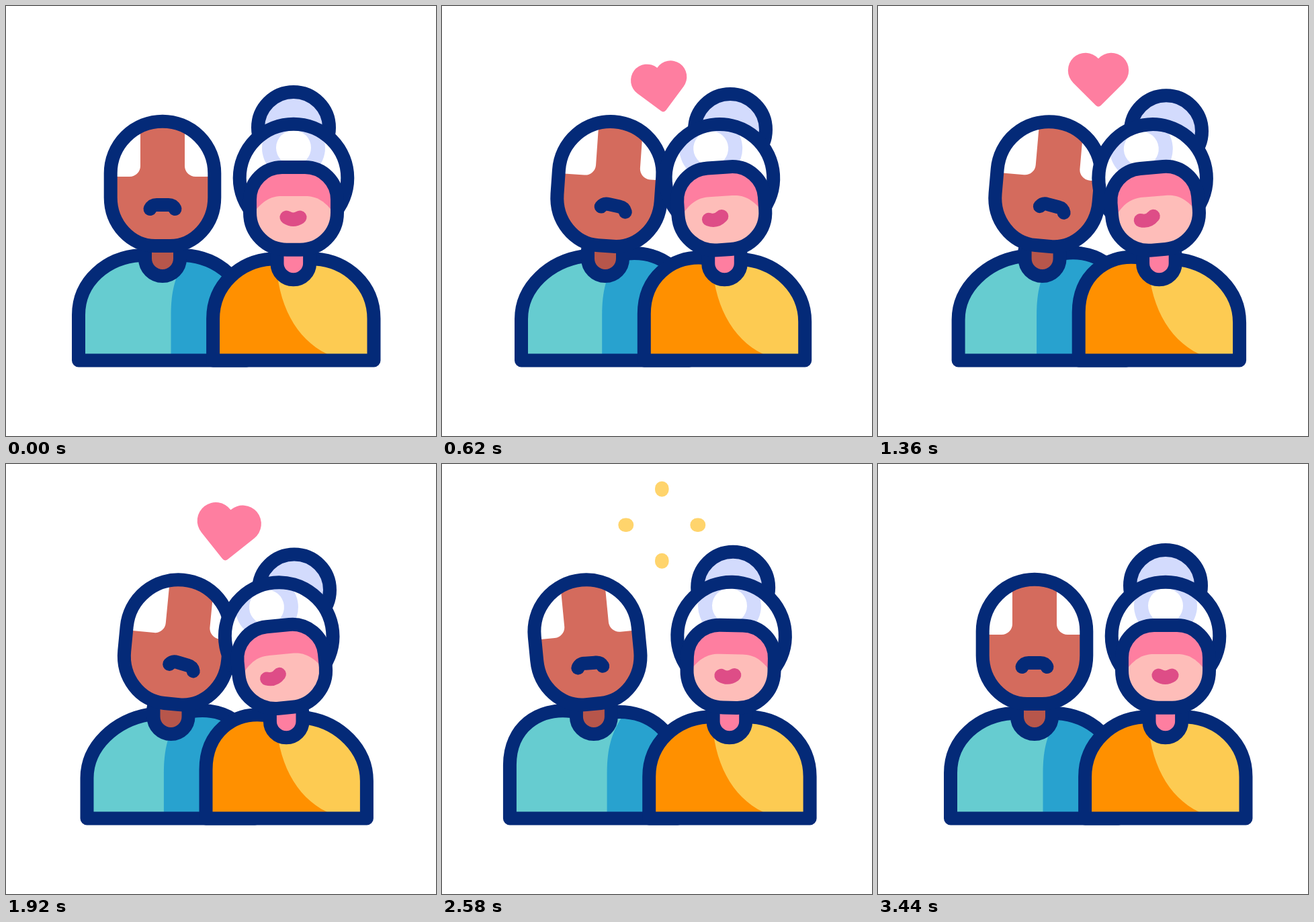
An HTML page with a canvas that plays this animation: 640 px wide and 640 px high, repeating every 3500 ms.

```html
<!DOCTYPE html>
<html lang="en">
<head>
<meta charset="utf-8">
<title>Couple in love</title>
<style>
  html, body { margin: 0; height: 100%; overflow: hidden; background: #fff; }
  canvas { display: block; }
</style>
</head>
<body>
<canvas width="640" height="640"></canvas>
<script>
const ctx = document.querySelector('canvas').getContext('2d');
const LOOP = 3500, NAVY = '#042a78', PINK = '#fe7ea0', LAVENDER = '#d3dbfd';

// Smooth curve through key values that never overshoots them
function curve(times, values) {
  const slope = i => (values[i + 1] - values[i]) / (times[i + 1] - times[i]);
  const tangent = i => {
    if (i === 0 || i === times.length - 1) return 0;
    const a = slope(i - 1), b = slope(i);
    return a * b <= 0 ? 0 : 2 * a * b / (a + b);
  };
  return t => {
    if (t >= times[times.length - 1]) return values[values.length - 1];
    let i = 0;
    while (t >= times[i + 1]) i++;
    const span = times[i + 1] - times[i], u = (t - times[i]) / span, v = 1 - u;
    return values[i] * v * v * (1 + 2 * u) + values[i + 1] * u * u * (3 - 2 * u)
      + span * u * v * (tangent(i) * v - tangent(i + 1) * u);
  };
}

const TIMES = [0, 620, 1360, 1920, 2100, 2300, 2700, 2860, 3260, 3440];
const sway = (...values) => curve(TIMES, values);
const man = {
  shift: sway(0, 10, 11.6, 12.5, 12.7, 6, -9.5, -6, -0.3, 0),
  tilt: sway(0, 4, 5, 5.5, 5.6, 1.5, -6.8, -4.5, -0.3, 0),
  turn: sway(0, 0.78, 0.92, 1, 1, 0.7, 0, 0, 0, 0)
};
const woman = {
  shift: sway(0, -7.3, -9.4, -10.6, -10.7, -8, 3, 5, 0.4, 0),
  tilt: sway(0, -3.8, -4.9, -5.5, -5.6, -3.2, 3, 4.9, 0.4, 0),
  turn: sway(0, 0.7, 0.93, 1, 1, 0.93, 0.05, 0, 0, 0),
  bunX: sway(0, 1, 1, 1, 1.2, 2.5, 6, 6.5, 0.5, 0),
  bunY: sway(0, 3, 5.3, 6.5, 6.5, 5, 2, 1.5, 0, 0)
};
const heartPop = curve([0, 480, 2160, 2260], [0, 1, 1, 0]);

const fill = (path, color) => { ctx.fillStyle = color; ctx.fill(path); };
const stroke = (path, color = NAVY, width = 20) => {
  ctx.strokeStyle = color;
  ctx.lineWidth = width;
  ctx.stroke(path);
};
const group = draw => { ctx.save(); draw(); ctx.restore(); };
const rotateAt = (x, y, degrees) => {
  ctx.translate(x, y);
  ctx.rotate(degrees * Math.PI / 180);
  ctx.translate(-x, -y);
};
const circle = (x, y, r) => {
  const path = new Path2D();
  path.arc(x, y, r, 0, 2 * Math.PI);
  return path;
};
const box = (x, y, w, h, radii) => {
  const path = new Path2D();
  path.roundRect(x, y, w, h, radii);
  return path;
};

// Filled outline with inner details clipped to it
function shape(path, color, details) {
  fill(path, color);
  group(() => { ctx.clip(path); details(); });
  stroke(path);
}

// left and right lift or drop each shoulder
function bodyPath(x, half, top, left, right) {
  const l = x - half, r = x + half;
  return new Path2D(`M${l} 527.5V${top + 89 + left}
    C${l} ${top + 38 + left * 1.4} ${x - half * 0.66} ${top + 3 + left} ${x - 33} ${top + left * 0.25}
    L${x + 33} ${top + right * 0.25}
    C${x + half * 0.66} ${top + 3 + right} ${r} ${top + 38 + right * 1.4} ${r} ${top + 89 + right}
    V527.5Z`);
}

function collar(x, y, r, color) {
  const path = new Path2D(`M${x - r} ${y - 14}V${y}a${r} ${r} 0 0 0 ${2 * r} 0V${y - 14}`);
  fill(path, color);
  stroke(path);
}

const shoulders = lean => [lean > 0 ? lean * 0.6 : lean * 1.7, -Math.abs(lean)];

const manHead = new Path2D('M155.7 249a77.3 77.3 0 0 1 154.6 0V285c0 40-30 72-66 72H222c-36 0-66.3-32-66.3-72Z');
const moustache = new Path2D('M214.5 302C218 295 222 296 226 296H240C244 296 248 295 251.5 302');
const hairLeft = box(90, 150, 110, 104, [0, 0, 16, 0]);
const hairRight = box(266, 150, 110, 104, [0, 0, 0, 16]);

function drawMan(t) {
  const shift = man.shift(t), turn = man.turn(t), shade = woman.shift(t);
  const [left, right] = shoulders(shift);
  shape(bodyPath(233 + shift, 125, 371, left, right), '#66ccd0', () => {
    ctx.translate(shade, 0);
    fill(new Path2D('M245.5 530V460c0-35 6-60 24-86L300 340H420V530Z'), '#28a2cf');
  });
  collar(233 + shift, 376, 26, '#b7564b');
  group(() => {
    ctx.translate(shift, 0);
    rotateAt(233, 365, man.tilt(t));
    shape(manHead, '#d46b5d', () => {
      ctx.translate(13 * turn, 0);
      fill(hairLeft, '#fff');
      fill(hairRight, '#fff');
    });
    ctx.translate(10 * turn, 0);
    rotateAt(233, 299, 11 * turn);
    stroke(moustache);
  });
}

const hair = circle(428, 256, 80.3);
const face = box(363, 240, 130, 122.7, [48, 48, 55, 55]);
const cheeks = new Path2D('M360 320C379 290 393 283 411 283H445C463 283 477 290 496 320V370H360Z');
const lips = new Path2D('M417.5 314.5Q427.5 321 437.5 314.5');
const sunnySide = new Path2D('M402 350V370C402 440 430 495 478 518V540H600V350Z');

function drawWoman(t) {
  const shift = woman.shift(t), turn = woman.turn(t);
  const [right, left] = shoulders(-shift);
  shape(bodyPath(427.8 + shift, 119.7, 376.5, left, right), '#ff9000', () => fill(sunnySide, '#fdcb52'));
  collar(427.8 + shift, 383, 24.3, PINK);
  const bun = circle(428 + woman.bunX(t), 181 + woman.bunY(t), 53);
  fill(bun, LAVENDER);
  stroke(bun);
  group(() => {
    ctx.translate(shift, 0);
    rotateAt(428, 373, woman.tilt(t));
    shape(hair, '#fff', () => {
      ctx.translate(-14 * turn, 0);
      fill(circle(428, 211, 47), LAVENDER);
      fill(circle(428, 211, 26), '#fff');
    });
    shape(face, PINK, () => fill(cheeks, '#febdb9'));
    ctx.translate(-13.5 * turn, 0);
    rotateAt(427.5, 316, -14 * turn);
    stroke(lips, '#de4d87');
  });
}

const heart = new Path2D(`M0-32.2A26 26 0 1 0-37.4 3.9L-4 37.3Q0 41.3 4 37.3
  L37.4 3.9A26 26 0 1 0 0-32.2Z`);

function drawHeart(t) {
  const pop = heartPop(t), drift = t - 1360;
  if (pop < 0.01) return;
  group(() => {
    ctx.translate(328 + drift * 0.0045, 110.5 - drift * 0.0149);
    ctx.rotate(drift * 0.0116 * Math.PI / 180);
    const size = pop * (1 + drift * 0.0001);
    ctx.scale(size, size);
    fill(heart, PINK);
  });
}

function drawSparkle(t) {
  const start = 2205, end = 2760;
  if (t < start || t > end) return;
  const rest = Math.max(0, 1 - (t - start) / 495);
  const outer = 55.5 * (1 - rest ** 3), inner = 55.5 * (1 - rest ** 2);
  const width = 20.5 * Math.min(1, (end - t) / 60);
  if (width <= 0) return;
  group(() => {
    ctx.translate(327.3, 90.7);
    for (let i = 0; i < 4; i++) {
      stroke(new Path2D(`M${inner} 0H${outer + 0.01}`), '#ffd46c', width);
      ctx.rotate(Math.PI / 2);
    }
  });
}

function frame(now) {
  const t = now % LOOP;
  ctx.fillStyle = '#fff';
  ctx.fillRect(0, 0, 640, 640);
  ctx.lineCap = ctx.lineJoin = 'round';
  drawMan(t);
  drawWoman(t);
  drawHeart(t);
  drawSparkle(t);
  requestAnimationFrame(() => frame(performance.now() - began));
}
const began = performance.now();
frame(0);
</script>
</body>
</html>
```
